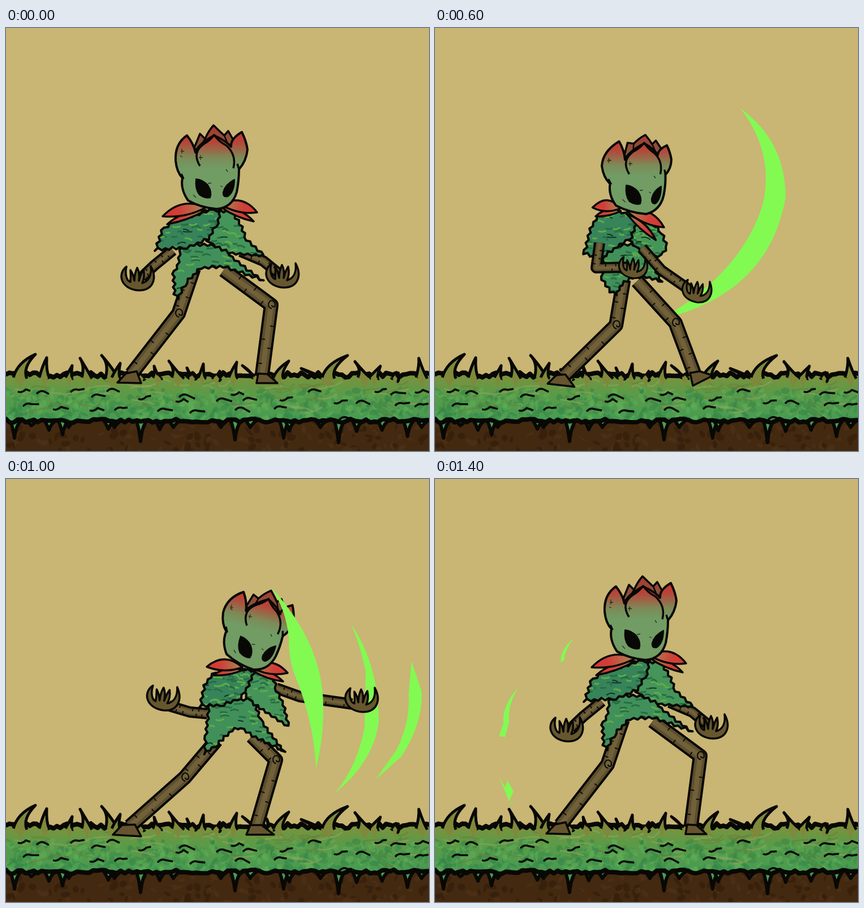
An HTML page with a canvas that plays this animation: 748x748 px, repeating every 1.5 s.

```html
<!DOCTYPE html>
<html lang="en">
<head>
<meta charset="utf-8">
<title>Plant warrior combo</title>
<style>
html, body { margin: 0; height: 100%; overflow: hidden; background: #c9b574; }
canvas { display: block; width: 100vw; height: 100vh; }
</style>
</head>
<body>
<canvas id="stage" width="748" height="748"></canvas>
<script>
const INK = '#080805', GLOW = '#82fa52', STEP = 100, STEPS = 15;
const stage = document.getElementById('stage').getContext('2d');
let ctx = stage;

const nums = s => s.match(/-?[\d.]+/g).map(Number);
const lerp = (a, b, t) => a + (b - a) * t;
const seeded = s => () => (s = s * 16807 % 2147483647) / 2147483647;
const pairs = a => a.reduce((out, v, i) => (i % 2 ? out[out.length - 1].push(v) : out.push([v]), out), []);

function shape(d, fill, line, width = 4) {
  const path = d instanceof Path2D ? d : new Path2D(d);
  if (fill) { ctx.fillStyle = fill; ctx.fill(path); }
  if (line) { ctx.strokeStyle = line; ctx.lineWidth = width; ctx.stroke(path); }
  return path;
}
function ramp(x0, y0, x1, y1, ...stops) {
  const g = ctx.createLinearGradient(x0, y0, x1, y1);
  stops.forEach(([at, color]) => g.addColorStop(at, color));
  return g;
}

// ---- Pose tracks: one row per key step ----
const KEYS = [0, 2, 4, 8, 10, 12, 14];
const track = s => { const rows = s.split('/').map(nums); return [...rows, rows[0]]; };
let key = 0, blend = 0;
const pose = rows => rows[key].map((v, j) => lerp(v, (rows[key + 1] || rows[key])[j], blend));

const legL = track('332,425 305,505 222,612/382,455 342,532 230,614/321,450 321,530 230,616/346,440 319,521 227,614/372,462 316,528 219,614/337,455 320,520 219,614');
const legR = track('385,428 469,490 453,612/400,450 500,525 451,613/340,455 402,530 485,612/375,440 448,513 433,613/435,455 477,497 443,614/368,428 459,503 451,612');
const footL = track('197,627 212,611 231,607 239,628/197,627 217,603 236,611 249,629/200,629 215,617 228,613 249,635/198,629 214,611 233,612 244,634/189,629 205,612 228,611 239,632/189,629 205,612 228,611 239,632');
const footR = track('443,628 446,611 462,612 480,628/430,628 441,612 456,612 470,629/490,635 476,608 494,602 515,600/422,630 426,612 442,612 468,629/425,629 432,612 452,612 474,629/438,633 443,612 460,610 488,627');
const armL = track('295,393 262,420 240,441/345,400 305,427 264,459/262,375 252,436 300,412/320,385 318,412 382,434/356,415 325,412 288,401/320,382 303,421 243,418');
const armR = track('415,395 455,412 482,434/440,420 462,442 485,452/320,388 375,432 418,460/412,390 426,425 482,466/478,370 520,385 612,398/400,328 465,260 452,190');
const handL = track('233,443 0 1/253,463 8 .95/300,412 0 .8/401,436 5 .95/278,388 5 1/225,410 -4 1');
const handR = track('489,438 0 1/490,454 -5 .8/430,460 5 .85/496,472 8 .95/629,391 0 1/441,172 -80 1');
const skirt = track('310,380 303,420 295,435 297,470 304,479 320,450 345,425 385,423 455,447 400,405 390,385/360,395 345,425 340,450 316,474 345,470 365,458 388,450 400,441 467,463 440,420 430,398/275,400 285,435 295,450 308,463 318,450 332,443 350,446 362,448 382,460 360,425 350,385/325,370 305,420 295,440 310,470 322,494 330,465 350,438 385,434 420,438 410,400 400,375/360,390 355,430 352,460 350,486 375,470 400,445 415,440 435,455 493,483 450,425 440,388/322,370 318,410 320,440 326,477 345,455 370,428 385,425 420,437 462,444 410,405 390,378');
const capeR = track('345,325 398,325 413,347 425,375 455,402 400,398 360,380 345,360/395,355 445,355 455,375 465,405 487,414 445,425 415,410 395,385/335,345 355,350 375,365 388,385 393,418 365,395 345,385 330,370/350,330 405,333 425,360 430,390 408,385 395,412 365,390 345,360/415,337 470,345 478,375 490,400 499,437 465,415 430,390 415,365/350,328 400,328 418,355 425,380 440,407 395,400 360,380 350,355');
const capeL = track('360,322 290,345 275,358 263,393 320,389 358,374 375,345 380,322/400,350 345,360 330,375 300,402 345,405 385,398 410,380 425,355/300,315 265,325 248,350 252,395 275,425 305,400 340,375 350,340/350,332 310,340 300,360 273,403 310,395 340,375 357,365 370,330/410,335 365,345 350,365 342,403 385,400 415,388 430,365 440,338/350,326 290,345 283,360 280,390 320,380 350,365 365,350 375,326');
// left root and two tips, then right root and two tips
const collar = track('354,317 277,333 285,347 380,312 444,326 438,342/398,350 318,331 314,350 418,337 479,354 473,367/300,312 266,320 280,333 288,324 360,346 343,378/357,325 291,315 288,333 392,325 450,359 438,372/418,333 355,332 367,347 436,334 498,343 490,358/340,328 265,332 268,351 378,328 420,280 432,293');
// chin x, y, tilt, turn
const headPose = track('372,320 0 0/429,353 -6 0/350,327 0 1/397,331 0 0/437,337 14 .3/358,332 -6 0');

const HEAD = {
  back: ['M332,214L343,187 352,196Q358,182 367,172Q378,183 386,190L393,182 403,200 403,215Z',
         'M312,228L313,208 326,202Q338,197 352,195Q356,202 357,210L363,205 373,217 372,228Z'],
  backLines: ['M352,196L346,205M386,190L393,207M356,190Q367,180 378,191',
              'M326,202L330,215M357,210L362,220M335,199L340,208'],
  skull: ['M320,190Q298,205 300,235Q302,255 312,265Q308,285 322,305Q345,318 372,320Q400,318 408,290Q412,270 412,250Q425,235 427,215Q425,200 417,184Q398,195 398,208L398,210Q390,200 368,190Q340,205 335,220Q332,205 320,190Z',
          'M306,200Q270,220 265,242Q268,262 282,275Q280,295 293,312Q320,325 350,327Q372,316 376,290Q379,275 378,258Q385,252 384,240Q382,228 378,220Q368,222 365,228L365,228Q358,215 347,207Q318,222 312,235Q312,215 306,200Z'],
  petals: ['M343,244Q328,220 350,205Q362,198 368,189Q375,200 390,208Q408,225 402,248M314,267L310,258M412,250L409,240',
           'M319,262Q305,238 325,222Q340,215 347,206Q352,215 360,223Q374,235 370,258M284,275L278,265M378,258L378,250'],
  eyes: ['M336,267Q334,285 342,295Q352,302 361,300Q365,290 357,278Q348,268 336,267ZM404,268Q388,276 384,290Q383,300 392,298Q404,290 404,268Z',
         'M315,278Q313,296 320,307Q330,314 340,311Q344,300 336,289Q327,279 315,278ZM371,281Q360,287 357,302Q357,314 363,312Q371,304 371,281Z'],
  marks: ['M309,218h6M311,213v9M308,226l4,2M341,229h7M344,225v8M389,250l3,4M357,275l6,-1M379,279l4,2M336,300l-5,-5',
          'M275,240h6M278,235v9M283,228l4,2M318,240h7M321,236v8M360,262l3,4M342,289l5,-1M353,290l3,2M312,305l-5,-5']
};
const HAND = 'M-20,-21C-37,-8 -30,19 2,21C27,21 35,0 23,-22C25,-5 19,5 8,8Q13,-2 10,-16Q5,-8 2,4Q4,-10 -1,-19Q-6,-8 -6,4Q-8,-8 -13,-15Q-12,-4 -13,6C-20,4 -23,-8 -20,-21Z';

// ---- Glow shapes by step: behind the body, then in front of it ----
const dots = s => pairs(nums(s)).map(([x, y]) => `M${x - 5},${y}a5,4 0 1 0 10,0a5,4 0 1 0 -10,0Z`).join('');
const swirl = 'M200,415Q222,414 228,428Q216,420 200,415ZM198,420Q215,425 225,445L230,470Q240,484 262,480L283,470Q285,484 262,488Q226,482 218,440ZM478,450L484,436 500,440 517,424Q515,452 505,455Z';
const glow = {
  2: [swirl],
  3: ['M355,505Q300,515 240,470Q300,495 355,490ZM420,470Q450,450 455,420Q470,460 420,480Z'],
  4: ['M374,352Q400,353 428,372Q400,364 374,352ZM377,360Q395,370 422,378L458,393 440,393 430,399 395,387ZM438,400q10,-5 20,6q-12,6 -20,-6ZM458,410l11,3 -8,2ZM487,402Q478,450 430,480Q390,512 340,512Q390,495 400,470L430,435 445,428 440,440Q470,420 487,402ZM482,440Q485,460 465,472Q468,450 482,440ZM448,488Q400,535 336,543L365,532 336,525Q400,510 448,488ZM345,497l40,-5 -30,8Z'],
  5: ['M340,530Q490,500 520,390Q525,330 500,290Q560,380 530,440Q470,540 340,530Z'],
  6: ['M400,515Q590,470 620,300Q620,200 540,142Q600,220 580,310Q545,430 400,515Z'],
  7: ['M600,390Q640,200 535,92Q440,90 300,148Q440,110 515,145Q590,240 600,390Z'],
  8: ['M428,445Q460,470 505,465L515,448 515,465Q540,465 553,457Q545,485 520,494Q490,500 513,521Q480,520 468,495Q440,485 428,445ZM402,403l12,20 0,14ZM301,146Q310,126 343,131Q318,134 301,146ZM318,114l10,4 2,8 -8,-4ZM421,155Q432,148 435,157L460,172 430,160ZM538,104Q517,110 518,140L526,163Q526,130 538,104ZM530,150L551,165 553,184 540,175ZM543,183l10,5 0,24 -8,-12ZM558,172Q578,190 577,215Q570,190 558,172ZM491,145Q530,190 523,222Q525,190 491,145ZM504,254Q524,270 523,298Q518,272 504,254Z' +
      'M570,272Q600,262 620,262Q628,240 620,223Q632,240 622,258L664,247Q630,250 622,264L627,270ZM562,302q10,8 5,18ZM616,312l4,-8 18,3 -16,1ZM630,353l18,2 5,15 -6,-10ZM573,372q5,-8 12,-2l22,13 -20,-4ZM555,385l10,-5 -5,14Z' +
      dots('375,137 583,242 552,265 568,282 479,309 533,400')],
  9: ['M520,490Q600,420 600,310Q630,430 520,490Z'],
  10: ['M610,256Q660,330 659,430Q650,500 582,555Q620,510 634,440L636,340Q625,290 610,256ZM717,322L735,375Q738,430 700,490L653,532 690,480Q715,430 712,380Z',
       'M468,191Q560,290 561,400Q562,460 548,512Q545,430 510,345Q500,320 500,280Q495,230 468,191Z'],
  11: ['M440,150Q610,150 650,310Q590,200 440,150Z'],
  12: ['', 'M345,178Q440,160 527,168L565,179Q440,192 345,178ZM202,277Q270,205 425,222L416,228 493,238 412,247Q270,240 202,277ZM131,413Q125,310 219,290Q203,300 208,306L277,318Q170,320 131,413Z'],
  13: ['M300,225Q215,250 205,330Q235,265 300,225ZM150,330Q105,400 125,500Q135,410 150,330Z'],
  14: ['M245,282Q222,300 222,325L229,320Q228,305 245,282ZM148,368Q118,400 121,432L113,455 124,456 131,430Q128,400 148,368ZM113,526L124,545 128,533 139,552 131,570ZM130,578L141,563 135,573Z']
};

// ---- Ground, drawn once ----
const ground = document.createElement('canvas');
ground.width = ground.height = 748;
function drawGround() {
  ctx = ground.getContext('2d');
  ctx.lineJoin = 'round';
  const rnd = seeded(77);
  ctx.fillStyle = '#c9b574';
  ctx.fillRect(0, 0, 748, 748);
  ctx.fillStyle = '#43290f';
  ctx.fillRect(0, 680, 748, 68);
  const speckle = (n, top, height, colors) => {
    for (let i = 0; i < n; i++) {
      ctx.fillStyle = colors[i % colors.length];
      ctx.beginPath();
      ctx.ellipse(rnd() * 748, top + rnd() * height, 3 + rnd() * 7, 2 + rnd() * 4, rnd() * 3, 0, 7);
      ctx.fill();
    }
  };
  speckle(150, 695, 55, ['#50331a88', '#38210c']);

  const drops = pairs(nums('15,725 45,703 76,711 100,719 111,706 181,709 192,706 238,731 272,710 296,706 380,706 405,728 432,706 491,725 501,712 556,706 588,733 620,713 665,711 710,722 735,706'));
  drops.forEach(([x, y]) => shape(`M${x - 9},692Q${x - 4},700 ${x},${y}Q${x + 3},700 ${x + 14},692`, '#4a9d55', INK, 6));

  let turf = 'M-9,614';
  for (let x = 0; x <= 756; x += 6) turf += `L${x},${609 + rnd() * 9}`;
  for (let x = 756; x >= -9; x -= 7) turf += `L${x},${691 + rnd() * 7}`;
  const path = shape(turf + 'Z', ramp(0, 610, 0, 698, [0, '#80913d'], [.4, '#5c9a47'], [1, '#459c54']), INK, 8);
  ctx.save();
  ctx.clip(path);
  speckle(420, 640, 55, ['#3a8c4a88', '#5fae5688', '#34834788']);
  for (let i = 0; i < 55; i++) {
    const x = rnd() * 748, y = 622 + rnd() * 60, w = 15 + rnd() * 28;
    shape(`M${x},${y}q${w / 2},${rnd() * 16 - 8} ${w},${rnd() * 20 - 10}`, 0, i % 2 ? '#6a803a99' : '#8aa55a99', 3);
  }
  ctx.restore();
  shape(path, 0, INK, 7);

  // base x, tip x, tip y, half width
  const blades = nums('25,52,577,12 68,72,583,9 112,117,597,7 143,131,584,9 187,169,579,11 195,202,593,8 238,222,604,8 268,262,598,9 304,288,589,11 329,320,601,8 347,349,594,7 372,378,607,8 402,408,591,8 442,418,597,8 468,461,601,7 482,500,589,9 563,522,602,9 570,604,579,11 634,617,590,12 651,662,598,9 688,694,610,7 735,730,584,10');
  for (let i = 0; i < blades.length; i += 4) {
    const [x, tx, ty, w] = blades.slice(i, i + 4);
    shape(`M${x - w},618Q${x - w * .4},${ty + 14} ${tx},${ty}Q${x + w * .3},${ty + 24} ${x + w},620`, '#80883b', INK, 5);
    shape(`M${x - w + 3},619L${x},614L${x + w - 3},620L${x},636Z`, '#80883b');
  }
  pairs(nums('33,640 66,644 42,666 95,671 126,641 163,650 160,673 204,673 190,640 246,653 280,675 318,650 312,657 337,678 384,657 410,645 417,673 431,656 496,655 486,671 546,641 592,660 631,661 601,690 664,640 692,646 700,665 735,641 735,667'))
    .forEach(([x, y], i) => shape(`M${x - 12},${y + 3}q7,${i % 3 ? -7 : 3} 14,-4l${7 + rnd() * 8},${rnd() * 9 - 2}`, 0, INK, 3.5));
}

// ---- Body parts ----
function limb(points, width) {
  const p = pairs(points), d = 'M' + p.join('L');
  shape(d, 0, INK, width + 8);
  shape(d, 0, '#5d4e2e', width);
  shape(d, 0, '#716139', width * .5);
  for (let i = 0; i < 2; i++) {
    const [[x, y], [u, v]] = [p[i], p[i + 1]], len = Math.hypot(u - x, v - y) || 1;
    const nx = (y - v) / len * width / 2, ny = (u - x) / len * width / 2;
    [.3, .5, .62, .85].forEach((t, j) => {
      const side = j % 2 ? 1 : -1, cx = lerp(x, u, t) + nx * side, cy = lerp(y, v, t) + ny * side;
      shape(`M${cx},${cy}l${-nx * side * .7},${-ny * side * .7}`, 0, INK, 1.8);
    });
  }
}
function leg(bones, foot) {
  const b = pose(bones), f = pose(foot);
  limb(b, 18);
  shape(`M${b[2] + 1},${b[3] + 6}a6,7 0 1 1 6,-6a3,3 0 0 1 -6,0`, 0, INK, 2);
  shape('M' + pairs(f).join('L') + 'Z', '#66542f', INK, 3.5);
}
function arm(bones, hand) {
  limb(pose(bones), 12);
  const [x, y, tilt, size] = pose(hand);
  ctx.save();
  ctx.translate(x, y);
  ctx.rotate(tilt * Math.PI / 180);
  ctx.scale(size, size);
  shape(HAND, '#66572f', INK, 3.5);
  ctx.restore();
}
function leafCloth(rows, seed, base) {
  const p = pairs(pose(rows)), rnd = seeded(seed);
  let d = '';
  p.forEach(([x, y], i) => {
    const [u, v] = p[(i + 1) % p.length], len = Math.hypot(u - x, v - y) || 1, n = Math.ceil(len / 7);
    for (let k = 0; k < n; k++) {
      const off = k % 2 ? -2 - rnd() * 2 : 1, t = k / n;
      d += `${d ? 'L' : 'M'}${lerp(x, u, t) + (y - v) / len * off},${lerp(y, v, t) + (u - x) / len * off}`;
    }
  });
  const path = shape(d + 'Z', base);
  const xs = p.map(q => q[0]), ys = p.map(q => q[1]);
  const left = Math.min(...xs), top = Math.min(...ys), w = Math.max(...xs) - left, h = Math.max(...ys) - top;
  ctx.save();
  ctx.clip(path);
  for (let i = 0; i < 54; i++) {
    const x = left + rnd() * w, y = top + rnd() * h, s = 8 + rnd() * 9;
    shape(`M${x},${y}q${s / 2},${rnd() * 10 - 6} ${s},${rnd() * 8 - 3}`, 0,
      i % 9 == 8 ? '#123520' : i % 2 ? '#5dac49' : '#276d44', i % 9 == 8 ? 2 : 3);
  }
  ctx.restore();
  shape(path, 0, INK, 4);
}
function petal(x, y, u, v, bulge) {
  const len = Math.hypot(u - x, v - y), nx = (y - v) / len * bulge, ny = (u - x) / len * bulge;
  const mx = lerp(x, u, .5), my = lerp(y, v, .5);
  shape(`M${x},${y}Q${mx + nx * 1.6},${my + ny * 1.6} ${u},${v}Q${mx - nx * .7},${my - ny * .7} ${x},${y}Z`,
    ramp(x, y, u, v, [0, '#a98a55'], [.6, '#cf4038'], [1, '#d83732']), INK, 3.5);
}
function drawCollar() {
  const [lx, ly, a, b, c, d, rx, ry, e, f, g, h] = pose(collar);
  petal(lx, ly + 5, c, d, 9);
  petal(rx, ry + 5, g, h, -9);
  petal(lx, ly, a, b, 17);
  petal(rx, ry, e, f, -17);
}
function drawHead() {
  const [x, y, tilt, turn] = pose(headPose);
  const morph = ([front, side]) => {
    const to = nums(side);
    let i = 0;
    return front.replace(/-?[\d.]+/g, v => lerp(+v, to[i++], turn));
  };
  ctx.save();
  ctx.translate(x, y);
  ctx.rotate(tilt * Math.PI / 180);
  ctx.translate(-372 + 22 * turn, -320 - 7 * turn);
  const top = 186 + 16 * turn;
  shape(morph(HEAD.back), ramp(0, top - 12, 0, top + 25, [0, '#a93a32'], [1, '#80583d']), INK, 3.5);
  shape(morph(HEAD.backLines), 0, INK, 2.5);
  shape(morph(HEAD.skull), ramp(0, top, 0, top + 62, [0, '#c7342f'], [.28, '#b3483a'], [.7, '#7c8b58'], [1, '#719c64']), INK, 4);
  shape(morph(HEAD.petals), 0, INK, 3.5);
  shape(morph(HEAD.eyes), INK, INK, 2);
  shape(morph(HEAD.marks), 0, '#24301c', 1.3);
  ctx.restore();
}

function draw(step) {
  key = KEYS.findLastIndex(k => k <= step);
  blend = key < KEYS.length - 1 ? (step - KEYS[key]) / (KEYS[key + 1] - KEYS[key]) : 0;
  const near = key + Math.round(blend), sideOn = near == 2;
  const leftOver = near == 3, rightOver = sideOn || leftOver;
  const [behind, front] = glow[step] || [];
  ctx.drawImage(ground, 0, 0);
  if (behind) shape(behind, GLOW);
  if (!leftOver) arm(armL, handL);
  if (!rightOver) arm(armR, handR);
  leg(legR, footR);
  leg(legL, footL);
  leafCloth(skirt, 31, '#41905a');
  leafCloth(capeR, 58, '#45955a');
  leafCloth(capeL, 94, '#37845a');
  if (rightOver) arm(armR, handR);
  if (leftOver) arm(armL, handL);
  (sideOn ? [drawHead, drawCollar] : [drawCollar, drawHead]).forEach(part => part());
  if (front) shape(front, GLOW);
}

drawGround();
ctx = stage;
ctx.lineJoin = 'round';
const start = performance.now();
(function tick() {
  draw(Math.floor((performance.now() - start) / STEP) % STEPS);
  requestAnimationFrame(tick);
})();
</script>
</body>
</html>
```
